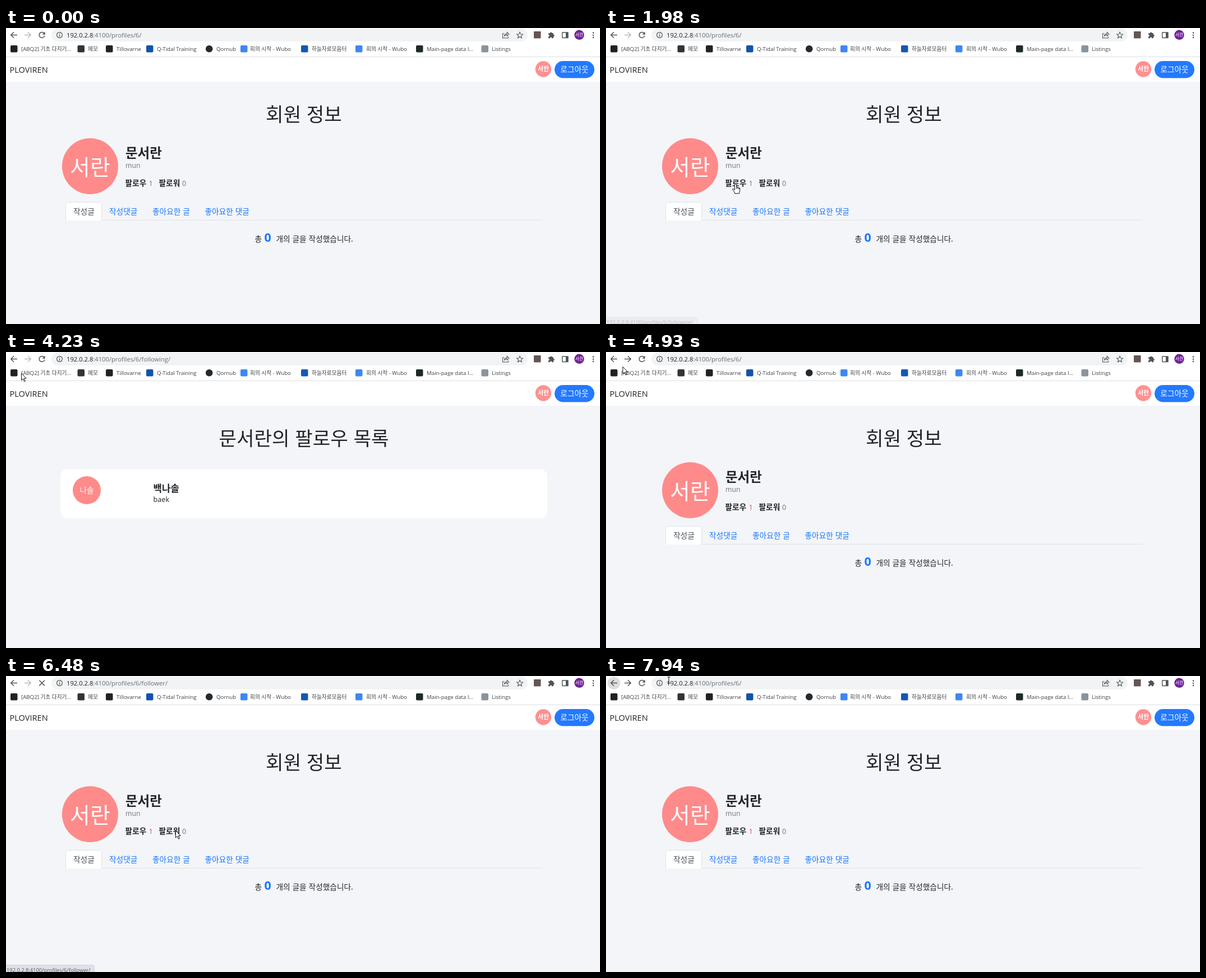
Recreate the animation shown at these times as an HTML page. Size 1059 by 529 pixels, loop 8 s.

```html
<!DOCTYPE html>
<html lang="ko">
<head>
<meta charset="utf-8">
<title>회원 정보</title>
<style>
html, body { margin: 0; width: 100%; height: 100%; overflow: hidden; background: #f4f5f8; }
svg { display: block; width: 100%; height: 100%; }
text { font: 13.7px "Noto Sans CJK KR", "Noto Sans CJK", sans-serif; fill: #212529; white-space: pre; }
.latin { font-family: "Open Sans", "Noto Sans CJK KR", "Noto Sans CJK", sans-serif; }
.title { font-size: 34.3px; font-weight: 300; text-anchor: middle; }
.bold { font-weight: 700; }
.mid { text-anchor: middle; }
.grey { fill: #6c757d; }
.blue { fill: #1677ff; }
.white { fill: #fff; }
.url { font-size: 11.2px; fill: #6a6e73; }
.mark { font-size: 9.7px; fill: #3c4043; }
.icon { fill: none; stroke: #505458; stroke-width: 1.5; }
.cursor { fill: #fff; stroke: #111; stroke-width: 1; stroke-linejoin: round; }
</style>
</head>
<body>
<svg viewBox="0 0 1059 529">
  <rect width="1059" height="529" fill="#f4f5f8"/>
  <rect width="1059" height="96" fill="#fff"/>
  <path d="M0 51.5H1059" stroke="#dcdee1"/>

  <!-- Browser toolbar -->
  <circle id="backHover" cx="14" cy="12.5" r="11.3" fill="#dcdddf"/>
  <path class="icon" d="M20 12.5H9M14 7.3L8.8 12.5L14 17.7"/>
  <path id="forward" class="icon" d="M33 12.5H44M39 7.3L44.2 12.5L39 17.7"/>
  <g id="reload">
    <path class="icon" d="M68 9.2A5 5 0 1 0 69 13.6"/>
    <path d="M69.6 6.8V11.8H64.6Z" fill="#505458"/>
  </g>
  <path id="stop" class="icon" d="M59.3 7.8L68.9 17.4M68.9 7.8L59.3 17.4"/>
  <rect x="81" y="1" width="849" height="23" rx="11.5" fill="#f1f3f4"/>
  <circle class="icon" cx="95.5" cy="12.5" r="4.9" style="stroke-width:1.2"/>
  <path class="icon" d="M95.5 11.8V15.4M95.5 9.5V10.8" style="stroke-width:1.3"/>
  <text class="latin url" x="108" y="16.6"><tspan fill="#202124">192.0.2.8</tspan><tspan id="path"></tspan></text>
  <g class="icon" style="stroke-width:1.1">
    <path d="M888.5 10H885.5V18H895.5V15.5M888.3 15Q889 10.4 893.2 10.3V7.6L897 11L893.2 14.3V12Q890 12 888.3 15Z"/>
    <path d="M916 7.3L917.6 11L921.5 11.3L918.5 13.9L919.4 17.8L916 15.7L912.6 17.8L913.5 13.9L910.5 11.3L914.4 11Z"/>
    <path d="M991.8 8H1001.8V17.5H991.8Z" stroke-width="1.4"/>
  </g>
  <rect x="941" y="6" width="12.5" height="12.5" rx="1" fill="#665555"/>
  <path d="M967 9.3H970A1.8 1.8 0 0 1 973.6 9.3H976V12A1.8 1.8 0 0 1 976 15.6V18.3H973.3A1.8 1.8 0 0 0 969.7 18.3H967V15.4A1.8 1.8 0 0 0 967 11.8Z" fill="#505458"/>
  <rect x="998" y="8" width="4.4" height="9.5" fill="#505458"/>
  <circle cx="1022" cy="12.3" r="8.7" fill="#72219b"/>
  <text class="mid white" x="1022" y="15" style="font-size:7.8px">서란</text>
  <g fill="#505458"><circle cx="1047" cy="8.5" r="1.3"/><circle cx="1047" cy="12.7" r="1.3"/><circle cx="1047" cy="16.9" r="1.3"/></g>
  <g id="bookmarks"></g>

  <!-- Site header -->
  <text class="latin" x="6.5" y="80.3" style="font-size:14.6px">PLOVIREN</text>
  <circle cx="958" cy="73.5" r="14.2" fill="#ff9090"/>
  <text class="mid white bold" x="958" y="77.2" style="font-size:11px">서란</text>
  <rect x="978" y="59" width="71" height="30.5" rx="15.2" fill="#2479ff"/>
  <text class="mid white" x="1013.5" y="79">로그아웃</text>

  <g id="profile">
    <text class="title" x="531" y="167">회원 정보</text>
    <circle cx="150" cy="247" r="50" fill="#ff8a8a"/>
    <text class="mid white" x="150" y="262.5" style="font-size:39px">서란</text>
    <text class="bold" x="213" y="231.5" style="font-size:23.5px">문서란</text>
    <text class="latin grey" x="213" y="250" style="font-size:12.3px">mun</text>
    <text class="bold" x="212.5" y="282">팔로우</text>
    <text id="followCount" class="latin" x="254.5" y="282" style="font-size:12.7px">1</text>
    <text class="bold" x="272.5" y="282">팔로워</text>
    <text class="latin grey" x="314" y="282" style="font-size:12.7px">0</text>
    <path d="M106.5 344V316.5Q106.5 311.5 111.5 311.5H165.5Q170.5 311.5 170.5 316.5V344" fill="#fff" stroke="#dee2e6"/>
    <path d="M170 343.5H956" stroke="#dee2e6"/>
    <text x="120" y="332.5" style="fill:#495057">작성글</text>
    <text class="blue" x="184" y="332.5">작성댓글</text>
    <text class="blue" x="261" y="332.5">좋아요한 글</text>
    <text class="blue" x="354.5" y="332.5">좋아요한 댓글</text>
    <text x="443.5" y="382">총</text>
    <text class="latin blue bold" x="460.5" y="382" style="font-size:21.5px">0</text>
    <text x="481.5" y="382">개의 글을 작성했습니다.</text>
  </g>

  <g id="following">
    <text class="title" x="531" y="167">문서란의 팔로우 목록</text>
    <rect x="97" y="209.5" width="868" height="87.5" rx="13" fill="#fff"/>
    <circle cx="144" cy="247" r="25" fill="#ff8a8a"/>
    <text class="mid white" x="144" y="252">나솔</text>
    <text class="bold" x="262.5" y="250" style="font-size:16.8px">백나솔</text>
    <text class="latin" x="262.5" y="268" style="font-size:12.7px">baek</text>
  </g>

  <g id="follower">
    <text class="title" x="531" y="167">문서란의 팔로워 목록</text>
    <text class="mid bold blue" x="531" y="211.5">팔로잉하는 사람이 없습니다.</text>
  </g>

  <g id="status">
    <path id="statusBox" fill="#dee1e6" stroke="#d0d3d7"/>
    <text id="statusText" class="latin" x="1" y="528.5" style="font-size:9.3px;fill:#55595e"></text>
  </g>

  <g id="cursor" class="cursor">
    <path id="arrow" d="M.5 .5V13L3.4 10.3L5.5 15.2L7.4 14.4L5.3 9.6H9.2Z"/>
    <g id="hand">
      <path d="M-1.6 1.5Q0 -.8 1.6 1.5V6.3Q3.3 5.4 4 7Q5.6 6.2 6.2 7.7Q7.7 7.3 7.7 9V12.5Q7.7 14 6.5 15.5V17.8H-1.5V16.2L-5.3 10.9Q-5.5 9 -3.7 9.5L-1.6 11.5Z"/>
      <path d="M1.6 6.3V9.5M4 7V9.7M6.2 7.7V10" fill="none"/>
    </g>
    <path id="beam" d="M-2.5 -5.5H2.5M0 -5.5V5.5M-2.5 5.5H2.5" fill="none"/>
  </g>
</svg>
<script>
const LOOP = 8000, STEP = 66;
const el = id => document.getElementById(id);
const show = (id, on) => { el(id).style.display = on ? '' : 'none'; };
const within = (t, ...spans) => spans.some(([from, to]) => t >= from && t < to);

// icon x, icon colour, round?, text x, label
const bookmarks = [
  [8, '#222', 0, 27, '[ABQ2] 기초 다지기...'],
  [127.5, '#333', 0, 146, '메모'],
  [178, '#222', 0, 197, 'Tillovarne'],
  [250, '#1353ab', 0, 269, 'Q-Tidal Training'],
  [356, '#24292f', 1, 375, 'Qornub'],
  [418, '#3f87f5', 0, 435, '회의 시작 - Wubo'],
  [526, '#1557b5', 0, 545, '하늘자료모음터'],
  [623, '#3f87f5', 0, 642, '회의 시작 - Wubo'],
  [731, '#1d2b27', 0, 750, 'Main-page data l...'],
  [847.5, '#8a949c', 0, 866, 'Listings']
];
el('bookmarks').innerHTML = bookmarks.map(([x, colour, round, textX, label]) =>
  `<rect x="${x}" y="31" width="12.5" height="12.5" rx="${round ? 6.25 : 2}" fill="${colour}"/>
   <text class="latin mark" x="${textX}" y="41">${label}</text>`).join('');

// time, x, y of the pointer tip
const route = [
  [66, 1029, 490], [270, 1000, 290], [470, 950, 86], [600, 917, 62], [740, 944, 45],
  [870, 975, 60], [940, 940, 80], [1130, 700, 170], [1330, 380, 270], [1530, 186, 296],
  [1640, 203, 317], [1710, 224, 300], [1780, 231, 278], [2700, 231, 278], [2710, 230, 278],
  [3680, 230, 278], [3830, 190, 226], [4030, 85, 105], [4224, 27, 37.5], [4500, 9, 11],
  [4640, 13, 11], [4860, 13, 11], [5060, 150, 135], [5330, 312, 268], [5460, 328, 275],
  [5560, 300, 261], [5660, 303, 277], [6180, 303, 277], [6250, 302, 276], [6880, 302, 276],
  [7060, 165, 155], [7194, 76, 73], [7430, 32, 32], [7670, 13, 11], [7750, 13, 11], [7920, 112, 7.5]
];

function pointerAt(t) {
  const next = route.findIndex(point => point[0] > t);
  if (next < 0) return route[route.length - 1].slice(1);
  if (next === 0) return route[0].slice(1);
  const [t0, x0, y0] = route[next - 1], [t1, x1, y1] = route[next];
  const k = (t - t0) / (t1 - t0);
  return [x0 + (x1 - x0) * k, y0 + (y1 - y0) * k];
}

const ramp = (t, from, to) => Math.min(1, Math.max(0, (t - from) / (to - from)));
const base = ':4100/profiles/6/';

function render(t) {
  const page = within(t, [3200, 4790]) ? 'following' : within(t, [6540, 7810]) ? 'follower' : 'profile';
  for (const name of ['profile', 'following', 'follower']) show(name, name === page);
  el('followCount').style.fill = t < 3200 ? '#6c757d' : '#dc4c58';

  el('path').textContent = base +
    (within(t, [2710, 4790]) ? 'following/' : within(t, [6190, 7810]) ? 'follower/' : '');

  const loading = within(t, [2180, 3270], [5860, 6660]);
  show('reload', !loading);
  show('stop', loading);
  el('stop').style.stroke = within(t, [5860, 6190]) ? '#24579f' : '#505458';
  el('forward').style.stroke = within(t, [4790, 6190], [7810, LOOP]) ? '#505458' : '#b9bbbe';
  show('backHover', within(t, [4580, 4920], [7670, LOOP]));

  const first = t < 4000, width = first ? 163.5 : 157.5;
  el('status').style.opacity = first
    ? ramp(t, 1910, 2110) - ramp(t, 2920, 3100)
    : ramp(t, 5740, 5850) - ramp(t, 6480, 6600);
  el('statusBox').setAttribute('d', `M-1 516.5H${width - 4}Q${width} 516.5 ${width} 520.5V530H-1Z`);
  el('statusText').textContent = '192.0.2.8' + base + (first ? 'following/' : 'follower/');

  const hand = within(t, [1780, 2710], [5330, 6250]);
  const beam = t >= 7860;
  show('cursor', t >= 66);
  show('hand', hand);
  show('beam', beam);
  show('arrow', !hand && !beam);
  el('cursor').setAttribute('transform', `translate(${pointerAt(Math.floor(t / STEP) * STEP)})`);
}

function tick() {
  render(performance.now() % LOOP);
  requestAnimationFrame(tick);
}
tick();
</script>
</body>
</html>
```
